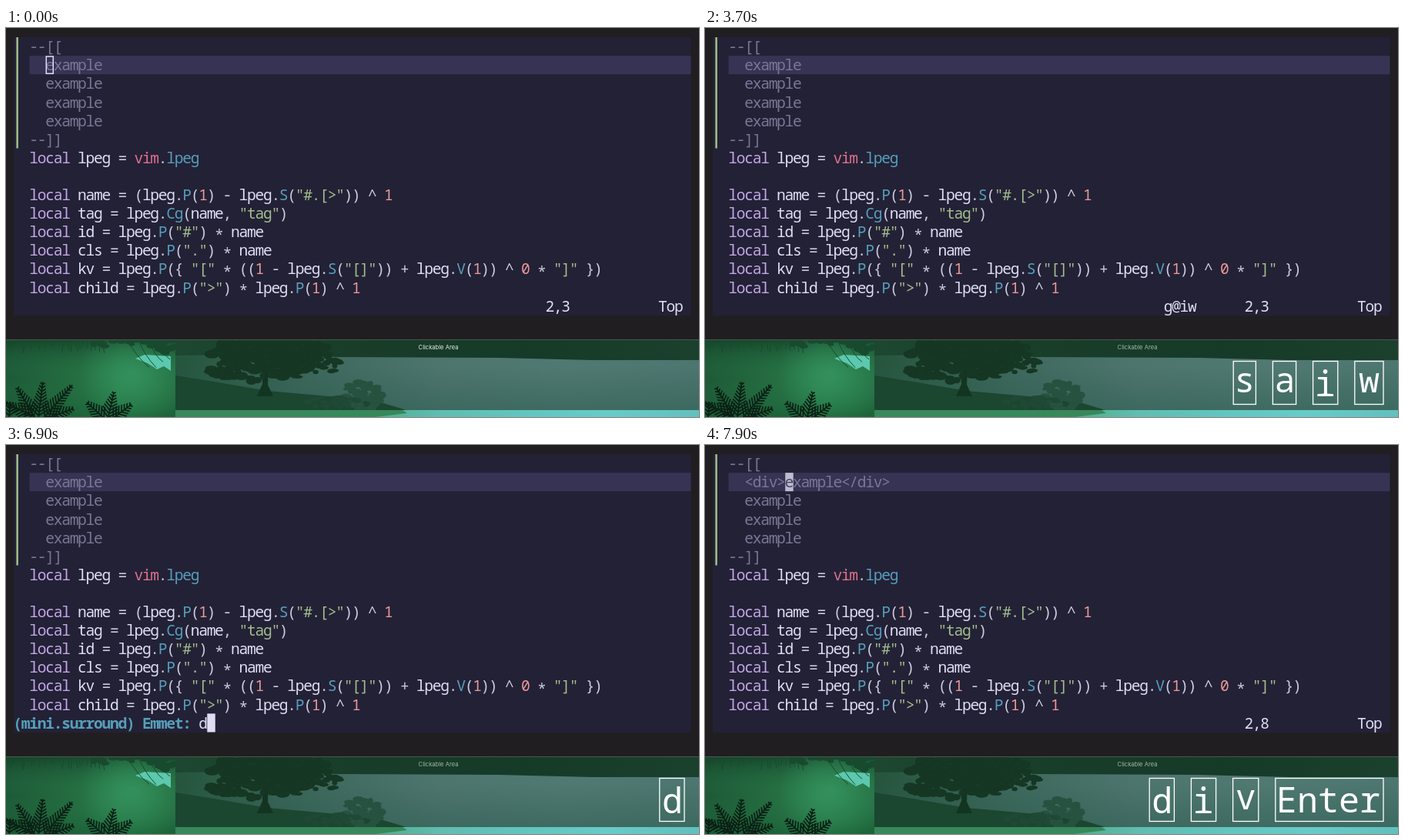
Recreate the animation shown at these times as an HTML page with a canvas. Size 900 by 506 pixels, loop 8000 ms.

```html
<!DOCTYPE html>
<html>
<head>
<meta charset="utf-8">
<style>
html, body { margin: 0; width: 100%; height: 100%; overflow: hidden; background: #201e20; }
canvas { display: block; }
</style>
</head>
<body>
<canvas id="stage" width="900" height="506"></canvas>
<script>
const stage = document.getElementById('stage');
let ctx = stage.getContext('2d');
const LOOP = 8000, CELL = 10.47, ROW = 24.1, LEFT = 10, TOP = 12;
const CODE_FONT = '19.6px "Noto Sans Mono", monospace';
const KEY_FONT = '45px "Noto Sans Mono", monospace';
const C = {
  bg: '#232136', line: '#373354', menu: '#3f3853', fg: '#e0def4', punct: '#cdcbe0',
  comment: '#7b7695', keyword: '#c4a7e7', blue: '#569fba', green: '#a3be8c',
  orange: '#ea9a97', red: '#e0708c'
};

const code = [
  'local lpeg = vim.lpeg',
  '',
  'local name = (lpeg.P(1) - lpeg.S("#.[>")) ^ 1',
  'local tag = lpeg.Cg(name, "tag")',
  'local id = lpeg.P("#") * name',
  'local cls = lpeg.P(".") * name',
  'local kv = lpeg.P({ "[" * ((1 - lpeg.S("[]")) + lpeg.V(1)) ^ 0 * "]" })',
  'local child = lpeg.P(">") * lpeg.P(1) ^ 1'
];
const entries = ['div.t', 'div#id', 'div#foo', 'div.foo', 'div.class', 'div.x[f=b]',
  'div_partial', 'div.t#foo[x=y]', 'div.cls#id[foo=bar]'];

// Times of the key presses
const T = { focus: 865, s: 2900, a: 3100, i: 3300, w: 3600, t: 4750, clear: 6250,
  d: 6880, di: 7150, div: 7350, enter: 7750 };
const strokes = [[T.s, 's'], [T.a, 'a'], [T.i, 'i'], [T.w, 'w'], [T.t, 't'],
  [T.d, 'd'], [T.di, 'i'], [T.div, 'v'], [T.enter, 'Enter']];

const colX = col => LEFT + col * CELL;
const rowY = row => TOP + row * ROW;

function rect(x, y, w, h, color) {
  ctx.fillStyle = color;
  ctx.fillRect(x, y, w, h);
}

function shape(color, points) {
  ctx.fillStyle = color;
  ctx.beginPath();
  points.forEach(p => ctx.lineTo(...p));
  ctx.fill();
}

function addStops(g, colors) {
  colors.forEach((c, i) => g.addColorStop(i / (colors.length - 1), c));
  return g;
}
const linear = (x0, y0, x1, y1, ...colors) =>
  addStops(ctx.createLinearGradient(x0, y0, x1, y1), colors);
const radial = (x, y, r, ...colors) =>
  addStops(ctx.createRadialGradient(x, y, 0, x, y, r), colors);

// Terminal text: every character is centred in its cell
function write(text, col, row, color, weight = '') {
  ctx.font = weight + ' condensed ' + CODE_FONT;
  ctx.textAlign = 'center';
  ctx.fillStyle = color;
  [...text].forEach((ch, i) =>
    ctx.fillText(ch, colX(col + i + 0.5), rowY(row) + (ch === '*' ? 23 : 19.2)));
}

function tokenColor(token) {
  if (token === 'local') return C.keyword;
  if (token === 'vim') return C.red;
  if (token[0] === '"') return C.green;
  if (/^\d/.test(token)) return C.orange;
  return /^\w/.test(token) ? C.fg : C.punct;
}

function writeCode(text, row) {
  for (const m of text.matchAll(/"[^"]*"|\w+|\S/g)) {
    const field = /^[A-Z]/.test(m[0]) || text.slice(0, m.index).endsWith('vim.');
    write(m[0], 2 + m.index, row, field ? C.blue : tokenColor(m[0]));
  }
}

function cursor(col, row, alpha, under = '') {
  ctx.globalAlpha = alpha;
  rect(colX(col), rowY(row), CELL, ROW, C.fg);
  if (under) write(under, col, row, C.bg);
  ctx.globalAlpha = 1;
}

function drawMenu(typed) {
  const list = typed === 'di' ? ['dialog', ...entries] : entries;
  const first = 14 - list.length, col = 23;
  ctx.globalAlpha = 0.8;
  rect(colX(col), rowY(first), 23 * CELL, list.length * ROW, C.menu);
  ctx.globalAlpha = 1;
  list.forEach((item, i) => {
    const row = first + i, n = typed.length;
    rect(colX(col), rowY(row), item.length * CELL, ROW + 0.3, C.menu);
    rect(colX(col + 20), rowY(row), 3 * CELL, ROW + 0.3, C.menu);
    write(item.slice(0, n), col, row, C.orange);
    write(item.slice(n), col + n, row, C.fg);
    write('CMD', col + 20, row, C.fg);
  });
}

function drawEditor(t) {
  const done = t >= T.enter, prompt = t >= T.t && !done;
  rect(10, 12, 879.5, 362, C.bg);
  rect(30.5, 36.2, 859, 24, C.line);
  rect(13.4, 12, 2.5, 144.5, C.green);
  ['--[[', done ? '  <div>example</div>' : '  example', '  example', '  example', '  example', '--]]']
    .forEach((s, row) => write(s, 2, row, C.comment));
  code.forEach((s, i) => writeCode(s, i + 6));

  const last = Math.max(T.focus, ...strokes.map(k => k[0]).filter(k => k <= t));
  const blink = 0.5 + 0.5 * Math.cos((t - last) / 1000 * 2 * Math.PI);
  if (prompt) {
    const typed = t >= T.div ? 'div' : t >= T.di ? 'di' : t >= T.d ? 'd' : '';
    write('(mini.surround) Emmet:', 0, 14, C.blue, '600');
    write(typed, 23, 14, C.fg);
    if (typed.length > 1) drawMenu(typed);
    cursor(23 + typed.length, 14, blink);
    return;
  }
  write(done ? '2,8' : '2,3', 66, 14, C.fg);
  write('Top', 80, 14, C.fg);
  if (t >= T.s && !done)
    write(t >= T.w ? 'g@iw' : t >= T.i ? 'g@i' : t >= T.a ? 'g@' : 's', 56, 14, C.fg);
  if (t < T.focus) {
    ctx.strokeStyle = C.fg;
    ctx.lineWidth = 1.5;
    ctx.strokeRect(52.3, 37, 9, 22.3);
  } else if (done) cursor(9, 1, blink, 'e');
  else if (t < T.w) cursor(4, 1, blink, 'e');
}

function drawKeys(t) {
  const keys = strokes.filter(([at]) => at <= t && (t < T.clear || at > T.clear));
  const pad = 5.1, gap = 22;
  let right = 881;
  ctx.font = KEY_FONT;
  ctx.textAlign = 'left';
  ctx.lineWidth = 1.3;
  ctx.fillStyle = ctx.strokeStyle = '#fff';
  for (const [, label] of keys.reverse()) {
    const m = ctx.measureText(label);
    const w = m.actualBoundingBoxLeft + m.actualBoundingBoxRight + 2 * pad;
    const x = right - w;
    ctx.strokeRect(x, 433.5, w, 56);
    ctx.fillText(label, x + pad + m.actualBoundingBoxLeft,
      461.5 + (m.actualBoundingBoxAscent - m.actualBoundingBoxDescent) / 2);
    right = x - gap;
  }
}

function frond(x, y, angle, length) {
  const along = (px, py, a, d) => [px + Math.cos(a) * d, py + Math.sin(a) * d];
  ctx.beginPath();
  ctx.moveTo(x, y);
  ctx.lineTo(...along(x, y, angle, length));
  for (let d = 4; d < length; d += 4.5) {
    const p = along(x, y, angle, d);
    for (const side of [-0.9, 0.9]) {
      ctx.moveTo(...p);
      ctx.lineTo(...along(...p, angle + side, 13 * (1 - d / length) + 3));
    }
  }
  ctx.stroke();
}

function paintLandscape() {
  let seed = 7;
  const rnd = () => (seed = seed * 16807 % 2147483647) / 2147483647;
  const leaves = (n, cx, cy, rx, ry, size, color) => {
    ctx.fillStyle = color;
    for (let i = 0; i < n; i++) {
      const a = rnd() * 2 * Math.PI, r = Math.sqrt(rnd());
      ctx.beginPath();
      ctx.ellipse(cx + Math.cos(a) * r * rx, cy + Math.sin(a) * r * ry,
        size * (0.6 + rnd()), size * (0.4 + rnd() * 0.5), 0, 0, 7);
      ctx.fill();
    }
  };
  ctx.save();
  ctx.beginPath();
  ctx.rect(0, 406, 900, 100);
  ctx.clip();

  // Bank on the left
  rect(0, 406, 220, 100, linear(0, 0, 220, 0, '#1d5a36', '#23693f', '#2a7d4b', '#256f43'));
  rect(0, 406, 220, 100, linear(0, 406, 0, 506, 'rgba(18,60,36,.7)', 'rgba(40,120,75,0)', 'rgba(18,85,45,.5)'));
  rect(0, 406, 220, 100, radial(165, 450, 70, 'rgba(58,160,105,.6)', 'rgba(58,160,105,0)'));
  shape('#5cc8ae', [[168, 430], [180, 425], [214, 427], [214, 446], [205, 440], [196, 444], [184, 436]]);
  leaves(26, 142, 409, 38, 8, 5, '#1a4a2e');
  leaves(30, 198, 412, 24, 11, 5, '#184a2f');
  ctx.strokeStyle = '#194a2d';
  ctx.lineWidth = 1;
  for (let x = 0; x < 135; x += 5) {
    ctx.beginPath();
    ctx.moveTo(x, 406);
    ctx.lineTo(x + rnd() * 8 - 4, 411 + rnd() * 12);
    ctx.stroke();
  }
  for (let i = 0; i < 4; i++) {
    ctx.beginPath();
    ctx.moveTo(158 + i * 14, 406);
    ctx.quadraticCurveTo(168 + i * 12, 426, 186 + i * 9, 430 + rnd() * 12);
    ctx.stroke();
  }
  ctx.strokeStyle = '#0b1f14';
  ctx.lineWidth = 1.7;
  [[38, 506, -2.7, 42], [38, 508, -2.1, 46], [42, 508, -1.45, 48], [48, 508, -0.85, 58], [52, 508, -0.35, 38],
    [4, 508, -1.5, 22], [130, 510, -2.4, 34], [132, 510, -1.35, 36], [136, 510, -0.65, 34]]
    .forEach(f => frond(...f));

  // Lake and far shore under the translucent panel
  rect(220, 406, 680, 91, linear(220, 0, 900, 0, '#25553d', '#3d675b', '#4d756e', '#507972', '#4c766f'));
  rect(220, 440, 680, 57, linear(220, 440, 220, 497, 'rgba(44,92,80,0)', 'rgba(44,92,80,.5)'));
  shape(linear(220, 0, 900, 0, '#1d4730', '#183d29', '#163a28', '#1b402e'),
    [[220, 406], [900, 406], [900, 432], [760, 432], [640, 429], [430, 428], [300, 425], [220, 426]]);
  shape('#1b4630', [[220, 452], [270, 460], [340, 472], [430, 480], [490, 488], [520, 497], [220, 497]]);
  shape('#143422', [[332, 440], [341, 440], [340, 464], [347, 479], [326, 479], [333, 463]]);
  leaves(150, 342, 424, 80, 20, 7, '#153724');
  leaves(110, 322, 442, 60, 18, 6, '#153724');
  leaves(50, 385, 438, 48, 16, 5, '#153724');
  leaves(90, 463, 479, 27, 19, 4.5, '#275240');
  leaves(28, 425, 487, 34, 8, 4.5, '#1f4935');

  rect(220, 497, 680, 9, linear(220, 0, 900, 0, '#2c8a55', '#3a9866', '#4aa67d', '#60bdb0', '#62c5bf', '#67cbc9', '#62c0bd'));
  shape('#37885a', [[220, 497], [515, 497], [521, 501], [480, 506], [220, 506]]);
  ctx.restore();
  rect(0, 405, 900, 1, '#48594f');
}

// The still landscape is painted once
const landscape = document.createElement('canvas');
landscape.width = 900;
landscape.height = 506;
const screen = ctx;
ctx = landscape.getContext('2d');
paintLandscape();
ctx = screen;

function draw(now) {
  const t = Math.floor(now % LOOP / 100) * 100;
  rect(0, 0, 900, 506, '#201e20');
  ctx.drawImage(landscape, 0, 0);
  drawEditor(t);
  ctx.font = '7.6px Inter, sans-serif';
  ctx.textAlign = 'center';
  ctx.fillStyle = t < T.focus ? '#e6ece8' : '#a4b5ab';
  ctx.fillText('Clickable Area', 561.5, 418.4);
  drawKeys(t);
  requestAnimationFrame(draw);
}
requestAnimationFrame(draw);
</script>
</body>
</html>
```
